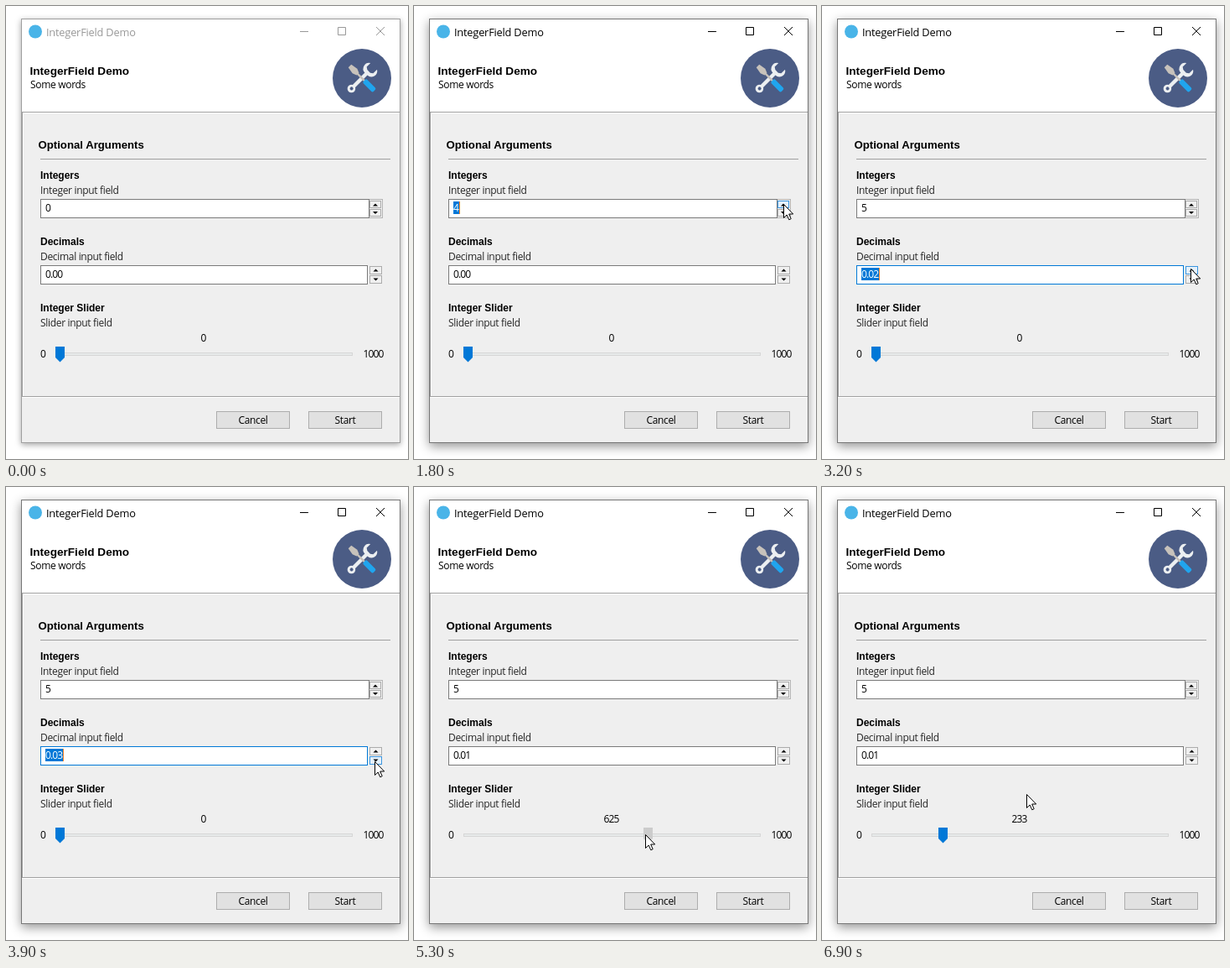
An HTML page that plays this animation: 480 by 540 pixels, repeating every 7000 ms.

```html
<!DOCTYPE html>
<html lang="en">
<head>
<meta charset="utf-8">
<title>IntegerField Demo</title>
<style>
html, body { margin: 0; width: 100%; height: 100%; overflow: hidden; background: #fff; }
#win { position: absolute; left: 18px; top: 15px; width: 453px; height: 506px; background: #efefef;
  box-shadow: 0 2px 7px rgba(0, 0, 0, .36); }
.active #win { box-shadow: 0 4px 12px rgba(0, 0, 0, .42); }
svg { position: absolute; left: 0; top: 0; display: block; }
text { font: 12px "Open Sans", "Noto Sans", sans-serif; letter-spacing: -.32px; fill: #000; white-space: pre; }
.bold { font: bold 12px "Liberation Sans", Arial, sans-serif; letter-spacing: 0; }
.head { font-size: 13.6px; }
.sect { font-size: 13.2px; }
.sub { fill: #262626; }
.num { letter-spacing: -.85px; }
.mid { text-anchor: middle; }
.frame { fill: none; stroke: #a0a0a0; }
.active .frame { stroke: #777; }
.bar text { font-size: 12.8px; letter-spacing: -.2px; fill: #999; }
.bar path { fill: none; stroke: #999; }
.active .bar text { fill: #000; }
.active .bar path { stroke: #000; }
.field { fill: #fff; stroke: #7a7a7a; }
.field.over { stroke: #171717; }
.field.focus { stroke: #0078d7; }
.push { fill: #e1e1e1; stroke: #adadad; }
.spin rect { fill: #f0f0f0; stroke: #acacac; }
.spin.over rect { fill: #e5f1fb; stroke: #3c96df; }
.sel { fill: #0078d7; }
.caret { fill: #ff8728; }
</style>
</head>
<body>
<div id="win"></div>
<svg width="480" height="540" viewBox="0 0 480 540">
  <rect class="frame" x="18.5" y="15.5" width="452" height="505"/>
  <rect x="19" y="16" width="451" height="110" fill="#fff"/>
  <path d="M19 126.5H470M19 465.5H470M41 182.5H459" stroke="#a0a0a0"/>
  <path d="M19 127.5H470M19 466.5H470" stroke="#fff"/>
  <path d="M19.5 127V465" stroke="#a0a0a0"/>
  <path d="M20.5 128V465" stroke="#fff"/>

  <g class="bar">
    <circle cx="35" cy="30.5" r="8" fill="#49b4e8"/>
    <text x="48" y="36">IntegerField Demo</text>
    <path d="M351 30.5h10M396.5 25.5h9v9h-9zM442 25l10 10M452 25l-10 10"/>
  </g>

  <circle cx="425" cy="86" r="35" fill="#4b5c85"/>
  <g transform="translate(425 86) rotate(45)">
    <path d="M-5.5 -20A7 7 0 0 0 -2.2 -7V13.5A4.8 4.8 0 1 0 2.2 13.5V-7A7 7 0 0 0 5.5 -20V-13.5L2.5 -11.5H-2.5L-5.5 -13.5Z" fill="#eceff1"/>
    <circle cy="17.5" r="2" fill="#4b5c85"/>
  </g>
  <g transform="translate(425 86) rotate(-45)">
    <path d="M-2.5 -20.5H2.5L4 -12L2 -7H-2L-4 -12Z" fill="#c7c2bb"/>
    <path d="M0 -8V5" stroke="#c7c2bb" stroke-width="2.4"/>
    <rect x="-3.2" y="4" width="6.4" height="17" rx="2" fill="#20a5ee"/>
  </g>

  <text class="bold head" x="28.5" y="82">IntegerField Demo</text>
  <text x="29" y="98">Some words</text>
  <text class="bold sect" x="38.5" y="170">Optional Arguments</text>
  <text class="bold" x="41" y="206">Integers</text>
  <text class="sub" x="41" y="224">Integer input field</text>
  <text class="bold" x="41" y="285">Decimals</text>
  <text class="sub" x="41" y="303">Decimal input field</text>
  <text class="bold" x="41" y="364">Integer Slider</text>
  <text class="sub" x="41" y="382">Slider input field</text>

  <rect x="433.5" y="230.5" width="16" height="22" fill="#f0f0f0" stroke="#b4b4b4"/>
  <rect class="field" id="intBox" x="41.5" y="230.5" width="392" height="22"/>
  <rect class="sel" id="intSel" x="47" y="233" width="7" height="15"/>
  <rect class="caret" id="intCaret" x="54" y="233" width="1" height="15"/>
  <text class="num" id="intVal" x="47" y="245"></text>
  <rect class="field" id="decBox" x="41.5" y="309.5" width="390" height="22"/>
  <rect class="sel" id="decSel" x="47" y="312" width="21" height="15"/>
  <rect class="caret" id="decCaret" x="68" y="312" width="1" height="15"/>
  <text class="num" id="decVal" x="47" y="324"></text>

  <g class="spin" id="intUp"><rect x="434.5" y="232.5" width="13" height="8"/><path d="M438 238.5h6l-3 -3z"/></g>
  <g class="spin"><rect x="434.5" y="242.5" width="13" height="8"/><path d="M438 245h6l-3 3z"/></g>
  <g class="spin" id="decUp"><rect x="434.5" y="310.5" width="14" height="9"/><path d="M438.5 316.5h6l-3 -3z"/></g>
  <g class="spin" id="decDown"><rect x="434.5" y="321.5" width="14" height="9"/><path d="M438.5 324.5h6l-3 3z"/></g>

  <text class="num mid" id="sliderVal" x="235.5" y="400"></text>
  <text class="num" x="41" y="419">0</text>
  <text class="num" x="426.5" y="419">1000</text>
  <rect x="59.5" y="413.5" width="354" height="3" fill="#e7eaea" stroke="#d6d6d6"/>
  <path id="thumb" d="M-5.5 406h11v13l-5.5 5.5l-5.5 -5.5z"/>

  <rect class="push" x="251.5" y="483.5" width="87" height="20"/>
  <text class="mid" x="295" y="498">Cancel</text>
  <rect class="push" x="361.5" y="483.5" width="87" height="20"/>
  <text class="mid" x="405" y="498">Start</text>

  <path id="cursor" d="M-.5 .5V16.5L3.2 13L5.8 18.8L8.2 17.7L5.7 12H10.7Z" fill="#fff" stroke="#000"/>
</svg>
<script>
const LOOP = 7000, STEP = 100, BLINK = 500;
const GRAB = 4700, DROP = 6500;
const $ = id => document.getElementById(id);

// [time, x, y]
const pointer = [
  [100, 455, 484], [300, 450, 410], [600, 444, 280], [900, 442, 233], [1100, 442, 236], [2100, 442, 236],
  [2500, 451, 335], [2800, 445, 321], [3000, 441, 313], [3600, 441, 313], [3800, 441, 327],
  [4300, 441, 327], [4600, 62, 421], [GRAB, 62, 416]
];
const leaving = [[DROP, 142, 413], [6600, 148, 406], [6800, 226, 372], [6900, 245, 366], [LOOP, 245, 366]];
// [time, value]
const drag = [[GRAB, 0], [4900, 140], [5300, 625], [5600, 800], [5800, 730], [6100, 400], [6300, 260], [6400, 233]];
// [time, change]
const intClicks = [1200, 1400, 1600, 1800, 2000].map(t => [t, 1]);
const decClicks = [[3000, 1], [3200, 1], [3400, 1], [3600, 1], [3900, -1], [4100, -1], [4300, -1]];

function sample(keys, t) {
  const i = keys.findIndex(k => k[0] >= t);
  if (i < 0) return keys[keys.length - 1].slice(1);
  if (i === 0) return keys[0].slice(1);
  const a = keys[i - 1], b = keys[i], p = (t - a[0]) / (b[0] - a[0]);
  return a.slice(1).map((v, n) => v + (b[n + 1] - v) * p);
}

function cursorAt(t, thumbX) {
  if (t < GRAB) return sample(pointer, t);
  if (t < DROP) return [thumbX - 2.5, 414];
  return sample(leaving, t);
}

function drawField(name, clicks, t, focus, format) {
  const done = clicks.filter(c => c[0] <= t);
  const last = done.length ? done[done.length - 1][0] : 0;
  const show = (part, on) => { $(name + part).style.visibility = on ? 'visible' : 'hidden'; };
  $(name + 'Val').textContent = format(done.reduce((sum, c) => sum + c[1], 0));
  $(name + 'Val').style.fill = focus ? '#fff' : '#000';
  show('Sel', focus);
  show('Caret', focus && (t - last) % (2 * BLINK) < BLINK);
}

function draw(t) {
  const value = Math.round(sample(drag, t)[0]);
  const thumbX = 64.5 + value * .344;
  const [x, y] = cursorAt(t, thumbX).map(Math.round);
  const within = (x0, y0, x1, y1) => t >= 100 && x >= x0 && x <= x1 && y >= y0 && y <= y1;
  const over = (id, on) => $(id).classList.toggle('over', on);
  const intFocus = t >= intClicks[0][0] && t < decClicks[0][0];
  const decFocus = t >= decClicks[0][0] && t < GRAB;

  document.body.classList.toggle('active', t >= 1100);
  drawField('int', intClicks, t, intFocus, n => n);
  drawField('dec', decClicks, t, decFocus, n => (n / 100).toFixed(2));
  $('decBox').classList.toggle('focus', decFocus);

  over('intBox', within(41, 230, 450, 253) && !intFocus);
  over('decBox', within(41, 309, 432, 332) && !decFocus);
  over('intUp', within(434, 232, 448, 241));
  over('decUp', within(434, 310, 449, 319));
  over('decDown', within(434, 320, 449, 331));

  const held = t >= GRAB && t < DROP;
  const hover = within(thumbX - 6, 406, thumbX + 6, 425);
  $('sliderVal').textContent = value;
  $('thumb').setAttribute('transform', `translate(${Math.round(thumbX - .5) + .5})`);
  $('thumb').style.fill = held ? '#ccc' : hover ? '#171717' : '#0078d7';
  $('cursor').setAttribute('transform', `translate(${x} ${y})`);
  $('cursor').style.visibility = t < 100 ? 'hidden' : 'visible';
}

const start = performance.now();
function tick() {
  const t = (performance.now() - start) % LOOP;
  draw(Math.floor(t / STEP) * STEP);
  requestAnimationFrame(tick);
}
tick();
</script>
</body>
</html>
```
